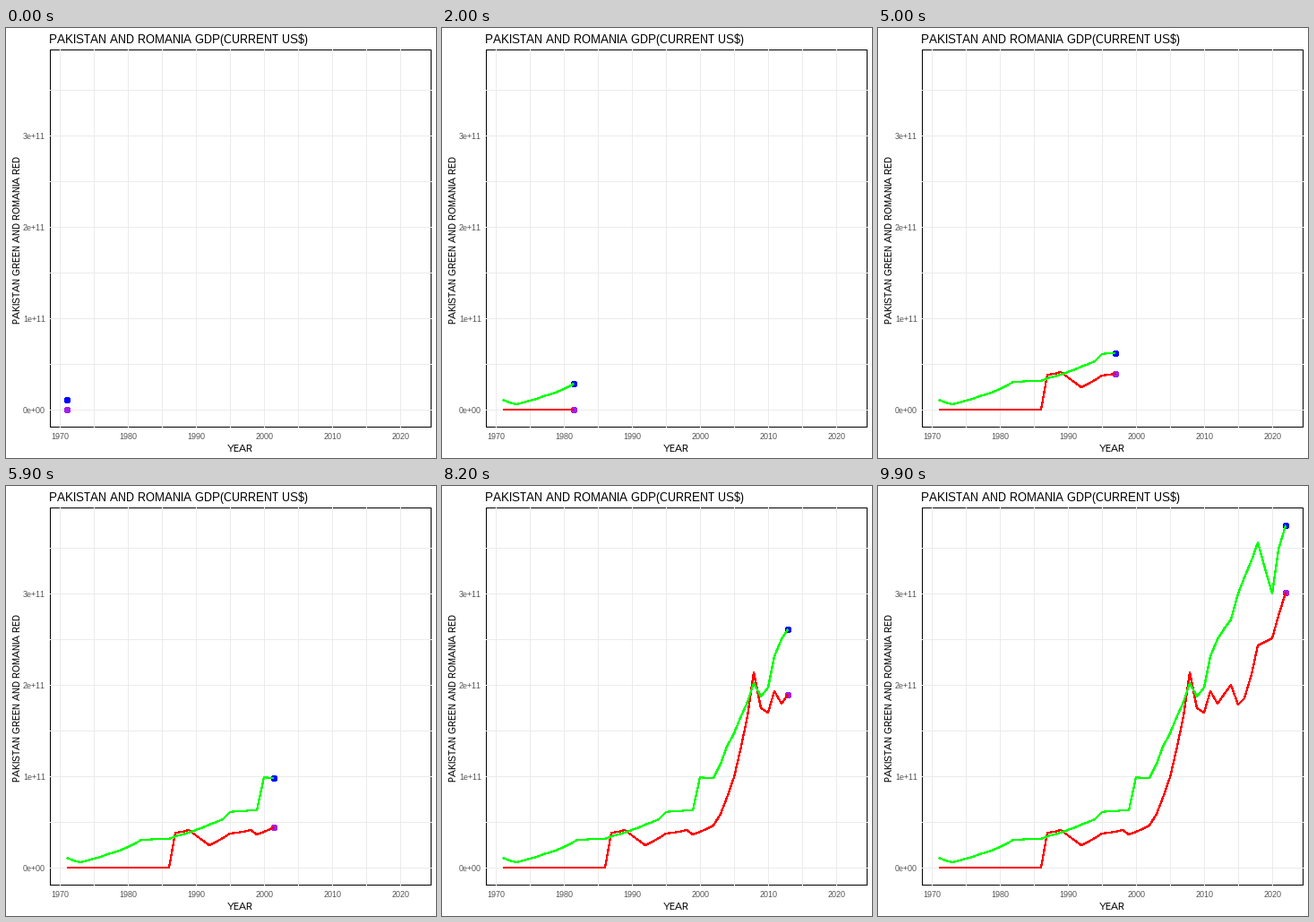
A matplotlib script that plays this animation: 480 by 480 pixels, repeating every 10 s.

```python
import numpy as np
import matplotlib.pyplot as plt
from matplotlib.animation import FuncAnimation
from matplotlib.patches import Circle

SIZE, DPI = 480, 72
FRAMES, INTERVAL = 100, 100
LEFT, RIGHT, TOP, BOTTOM = 49, 474, 24, 445
GRID, TICK = "#EBEBEB", "#4D4D4D"

# Fully hinted text with whole-pixel advances
plt.rcParams.update({
    "font.family": "Liberation Sans",
    "text.hinting": "default",
    "text.hinting_factor": 1,
    "text.kerning_factor": 6,
})

YEARS = np.arange(1971, 2023)

# Each year lands on a whole frame
KEYS = np.floor((YEARS - YEARS[0]) * (FRAMES - 1) / (len(YEARS) - 1) + 0.5)

# Turning points: year and GDP in billions of US$
PAKISTAN = [(1971, 10.7), (1973, 6.4), (1977, 15), (1982, 30.5), (1986, 32),
            (1994, 53), (1995, 61), (1999, 63), (2000, 99), (2002, 98),
            (2004, 132), (2008, 202), (2009, 187), (2010, 197), (2011, 231),
            (2012, 250), (2014, 271), (2015, 300), (2018, 356), (2020, 300),
            (2021, 348), (2022, 374.7)]
ROMANIA = [(1986, 0.01), (1987, 38), (1989, 41.5), (1992, 25), (1995, 37),
           (1998, 41), (1999, 36), (2002, 46), (2008, 214), (2009, 174),
           (2010, 170), (2011, 193), (2012, 179), (2014, 200), (2015, 178),
           (2016, 185), (2018, 243), (2020, 251), (2022, 301)]


def growth(points):
    """Yearly values with a steady rate of growth between turning points."""
    years, values = zip(*points)
    return np.exp(np.interp(YEARS, years, np.log(values)))


def px(year):
    return np.floor(60.76 + 7.585 * (year - 1970))


def py(value):
    return np.floor(426.7 - 1.0213 * value)


fig = plt.figure(figsize=(SIZE / DPI, SIZE / DPI), dpi=DPI, facecolor="white")
ax = fig.add_axes([0, 0, 1, 1])
ax.set(xlim=(0, SIZE), ylim=(SIZE, 0))
ax.axis("off")


def rule(x0, y0, x1, y1, color):
    """One-pixel line through pixel centres."""
    ax.plot([x0 + 0.5, x1 + 0.5], [y0 + 0.5, y1 + 0.5], color=color, lw=0.9,
            aa=False, snap=False, solid_capstyle="projecting", zorder=1)


def label(x, y, text, size, color="black", ha="center", **kw):
    ax.text(x, y, text, size=size, color=color, ha=ha, va="baseline", **kw)


for x in (LEFT, RIGHT):
    rule(x, TOP, x, BOTTOM, "black")
for y in (TOP, BOTTOM):
    rule(LEFT, y, RIGHT, y, "black")

# The grid runs over the border
for year in range(1970, 2021, 5):
    rule(px(year), TOP, px(year), BOTTOM, GRID)
    if year % 10 == 0:
        label(px(year) + 0.5, 459, str(year), 9, TICK)
for value in range(0, 351, 50):
    rule(LEFT, py(value), RIGHT, py(value), GRID)
    if value % 100 == 0:
        text = f"{value // 100}e+{'11' if value else '00'}"
        label(44, py(value) + 4, text, 9, TICK, ha="right")

label(48, 17, "PAKISTAN AND ROMANIA GDP(CURRENT US$)", 13, ha="left")
label(261, 473, "YEAR", 11)
label(16, 236, "PAKISTAN GREEN AND ROMANIA RED", 11,
      rotation=90, rotation_mode="anchor")


class Series:
    def __init__(self, points, line_color, dot_color, z):
        self.values = growth(points)
        self.line, = ax.plot([], [], color=line_color, lw=1.2, aa=False,
                             snap=False, solid_capstyle="butt", zorder=4 - z)
        self.dot = Circle((0, 0), 3.1, color=dot_color, lw=0, aa=False,
                          snap=False, zorder=2 + z)
        ax.add_patch(self.dot)

    def show(self, frame):
        past = KEYS < frame
        head = np.interp(frame, KEYS, YEARS)
        tip = np.interp(frame, KEYS, self.values)
        x = px(np.append(YEARS[past], head))
        y = py(np.append(self.values[past], tip))
        self.line.set_data(x, y)
        self.dot.set_center((x[-1] + 0.5, y[-1] + 0.5))
        return self.line, self.dot


pakistan = Series(PAKISTAN, "#00FF00", "#0000FF", 0)
romania = Series(ROMANIA, "#FF0000", "#A020F0", 0.5)


def update(frame):
    return (*pakistan.show(frame), *romania.show(frame))


anim = FuncAnimation(fig, update, frames=FRAMES, interval=INTERVAL,
                     init_func=lambda: update(0), repeat=True, repeat_delay=0)
plt.show()
```
